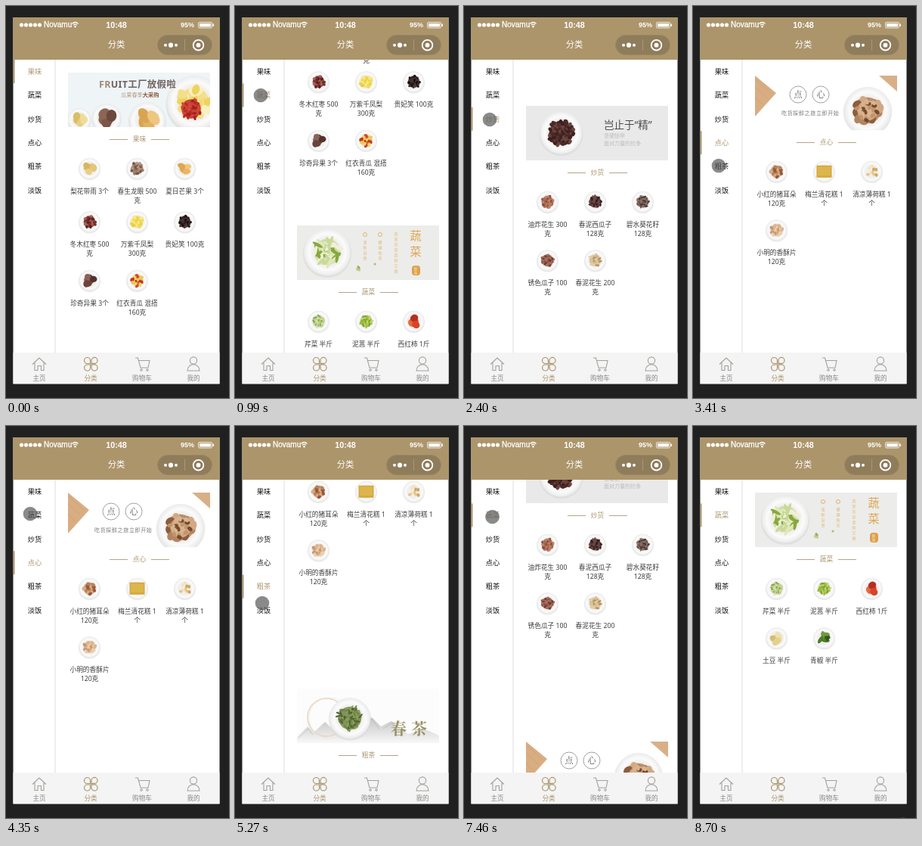
An HTML page that plays this animation: 295x518 px, repeating every 8780 ms.

```html
<!DOCTYPE html>
<html lang="zh-CN">
<head>
<meta charset="utf-8">
<title>分类</title>
<style>
html, body { margin: 0; width: 100%; height: 100%; overflow: hidden; background: #202020; }
svg { display: block; overflow: hidden; }
text { font-family: "Noto Sans", "Noto Sans CJK SC", "Noto Sans CJK", sans-serif; }
.latin { font-family: "Liberation Sans", Arial, sans-serif; }
.brush { font-family: "Noto Serif CJK SC", "Noto Sans CJK SC", serif; }
</style>
</head>
<body>
<svg id="stage" width="100%" height="100%" viewBox="0 0 295 518"></svg>
<script>
const LOOP = 8780, PAGE = 387, SCROLL = 500;
const TAN = '#ab956d', INK = '#3c3c3c', GREY = '#a5a09a';
const tabs = ['果味', '蔬菜', '炒货', '点心', '粗茶', '淡饭'];

let seed = 7;
const rnd = () => (seed = seed * 16807 % 2147483647) / 2147483647;

// Text centred vertically on y
const left = (x, y, s, size, fill, more = '') =>
  `<text x="${x}" y="${y + size * .36}" font-size="${size}" fill="${fill}" ${more}>${s}</text>`;
const text = (x, y, s, size, fill, more = '') => left(x, y, s, size, fill, 'text-anchor="middle" ' + more);
const rect = (x, y, w, h, fill, more = '') =>
  `<rect x="${x}" y="${y}" width="${w}" height="${h}" fill="${fill}" ${more}/>`;
const circle = (x, y, r, fill, more = '') => `<circle cx="${x}" cy="${y}" r="${r}" fill="${fill}" ${more}/>`;
const path = (d, stroke, w = 1, fill = 'none', more = '') =>
  `<path d="${d}" stroke="${stroke}" stroke-width="${w}" fill="${fill}" ${more}/>`;
const column = (x, y, s, size, fill, step) =>
  [...s].map((c, i) => text(x, y + i * step, c, size, fill)).join('');

// Random heap of oval pieces; large heaps get a solid bed
function heap(x, y, r, colors, n, size, thin = .65) {
  const c = colors.split(' ');
  let out = n > 11 ? circle(x, y, r * .8, c[0], 'opacity=".85"') : '';
  for (let i = 0; i < n; i++) {
    const a = i * 2.4 + rnd(), d = Math.sqrt((i + .3) / n) * Math.max(r - size * .7, 0);
    const px = (x + d * Math.cos(a)).toFixed(1), py = (y + d * Math.sin(a) * .95).toFixed(1);
    out += `<ellipse cx="${px}" cy="${py}" rx="${size}" ry="${size * thin}" fill="${c[i % c.length]}" transform="rotate(${rnd() * 180 | 0} ${px} ${py})"/>`;
  }
  return out;
}
const plate = (x, y, r, ...food) =>
  circle(x, y + r * .06, r * 1.04, '#d9d9d9', 'opacity=".6"') + circle(x, y, r, 'url(#dish)') +
  heap(x, y, r * .7, ...food);

// label, colours, piece count, piece size, thinness
const goods = [
  [['梨花带雨 3个', '#e8cf86 #d8b65f #e2c77c', 6, 4.8, .8], ['春生龙眼 500|克', '#9b7763 #77584a #b89a86', 26, 2, .9],
   ['夏日芒果 3个', '#ebb75c #e0a650 #f0c878', 5, 5.4, .65], ['冬木红枣 500|克', '#7a2f28 #591f1c #a4645a', 22, 2.2, .8],
   ['万紫千凤梨|300克', '#f2dc58 #e9cf45 #f7e98b', 24, 2.8, .7], ['贵妃笑 100克', '#2b1d1c #45302c #150e0e', 22, 1.9, .8],
   ['珍奇异果 3个', '#6d443b #8b6257 #53322c', 7, 4.8, .85], ['红衣青瓜 混搭|160克', '#f0d65c #c8322a #e9c84f #d0453a', 20, 2.4, .7]],
  [['芹菜 半斤', '#bcd08a #d5e0aa #86a54c', 22, 2.8, .4], ['泥蒿 半斤', '#9dbd3f #7da12f #c3d774', 28, 3.2, .35],
   ['西红柿 1斤', '#d8432a #e8683c #b52f20', 4, 5.4, .85], ['土豆 半斤', '#e3d28b #d3bd72 #eee3ae', 4, 6.5, .65],
   ['青椒 半斤', '#4d7d28 #6f9c3a #33591c', 8, 5.5, .45]],
  [['油炸花生 300|克', '#a8674f #8f4f3e #c08468', 30, 2, .7], ['春泥西瓜子|128克', '#4b2d2b #6c4844 #341d1d', 30, 2, .6],
   ['碧水葵花籽|128克', '#6b5049 #8b736a #46332f', 30, 2.2, .45], ['锈色瓜子 100|克', '#8f5346 #a9705c #6b382f', 32, 2, .55],
   ['春泥花生 200|克', '#d6bd92 #b7955f #e2cea6', 18, 2.8, .5]],
  [['小红的猪耳朵|120克', '#b98059 #96593a #d7ab83', 18, 2.7, .75], ['梅兰清花糕 1|个', 'cake', 0, 0],
   ['清凉薄荷糕 1|个', '#e6c68a #f2e3c1 #d3a55b', 9, 2.4, .8], ['小明的香酥片|120克', '#dcb48c #e9ceb0 #c89870', 20, 2.9, .7]],
  [],
  [['素米 327克', '#e6d9c6 #dfd0bb #ece1d2', 40, 1.5, .7], ['绿豆 125克', '#74603a #5d4a2a #86734a', 44, 1.5, .9],
   ['芝麻 50克', '#3f2a34 #2c1c24 #4e3742', 44, 1.5, .8], ['猴头菇 370克', '#8a7460 #5c4a3c #b29a80', 16, 2.5, .8],
   ['冰心鸡蛋 2个', '#eee2cf #e2d2ba', 3, 4, .75], ['八宝莲子 200|克', '#e6d6bb #d5bf9d #cdb28e', 24, 1.8, .85],
   ['深涧木耳 78克', '#33292a #5b4c46 #1f1819', 18, 2.6, .7]]
];

const banners = [
  () => rect(82, 88, 188, 72, '#eff4f7') +
    plate(97, 150, 15, '#e6cf84 #d9bd68 #efdc9a', 6, 5.5, .85) + plate(133, 148, 19, '#7b5747 #8d6554 #6b483b', 6, 8, .85) +
    plate(187, 151, 24, '#e3b25c #d9a452 #edc680', 6, 10.5, .65) + plate(249, 128, 36, '#f3df8a #efd35f #faf0bd', 34, 7, .7) +
    heap(245, 136, 16, '#bd2a24 #d7473a #a31f1d', 30, 2.8, .6) +
    left(123, 103.5, '<tspan fill="#a18a77">FR</tspan>UIT工厂放假啦', 12.5, '#6f625f', 'font-weight="600" letter-spacing=".3"') +
    left(152, 117.5, '瓜果春季<tspan font-weight="700" fill="#8b5a3c">大采购</tspan>', 7.2, '#b39a80'),
  () => rect(82, 88, 188, 72, '#ececea') + plate(122, 123, 31, '#c9d99a #dfe8b8 #86a83f #eef1d6', 40, 7.5, .28) +
    column(239, 102, '蔬菜', 15, '#dfa64e', 21) + rect(234, 141, 11, 13, '#dda24c', 'rx="4"') +
    column(239, 145, '鲜味', 4.5, '#f6e6c8', 5) + column(213, 99, '我家的蔬菜鲜又嫩', 5, '#e3bd83', 7) +
    [172, 192].map((x, i) => circle(x, 100, 2.5, 'none', 'stroke="#dfa64e" stroke-width=".8"') +
      column(x, 110, ['清新自然', '健康每天'][i], 5, '#dfb574', 7.2)).join('') +
    heap(163, 145, 4, '#9cae5c #c3cc93', 4, 3, .5) + circle(185, 139, 1.5, '#b3b86a'),
  () => rect(82, 88, 188, 72, '#e9e9e9') + plate(128.5, 123.5, 28, '#4c2926 #6b423c #3d201f', 80, 3, .75) +
    left(185, 113, '岂止于“精”', 13.5, '#4a4a4a') + left(185, 127, '坚硬铠甲', 7, '#bbb') + left(185, 137.5, '面对力量的抗争', 7, '#bbb'),
  () => rect(82, 88, 188, 72, '#fff') + path('M82 88L110 111L82 142Z', 'none', 0, '#d9ad82') +
    path('M82 92L103 111M82 103L98 118M82 116L91 126', '#c99a6d', .6) + path('M246 88H270V109Z', 'none', 0, '#d8b088') +
    plate(231, 134, 31, '#b28560 #8d5d3d #d2a983', 28, 6.5, .75) +
    heap(231, 134, 17, '#d9b48e #754a30 #c1946e', 18, 3.6, .7) +
    ['点', '心'].map((c, i) => circle(139 + i * 30, 113, 11, 'none', 'stroke="#888" stroke-width=".8"') +
      text(139 + i * 30, 113, c, 11, '#555', 'class="brush"')).join('') +
    left(117, 137, '吃货探鲜之旅立即开始', 7, '#777', 'letter-spacing=".65"'),
  () => rect(82, 88, 188, 72, '#fcfcfc') +
    path('M82 152L96 138L104 146L119 132L138 150L165 139L181 126L193 138L207 131L229 148L250 141L270 150V160H82Z', 'none', 0, 'url(#mist)') +
    path('M84 153L97 141L103 149M170 138L181 128L191 142M196 141L207 134L218 146', '#bbb', .7) +
    circle(121, 126, 25, 'none', 'stroke="#e6d3bf" stroke-width="1.5"') + circle(125, 127, 27, 'none', 'stroke="#efe4d8" stroke-width=".7"') +
    plate(152, 127, 27, '#6f8345 #8ba05a #4e6230', 60, 4, .3) +
    left(206, 140, '春茶', 21, '#9b9166', 'class="brush" font-weight="600" letter-spacing="6"'),
  () => rect(82, 88, 188, 72, 'url(#linen)') +
    path('M266 160C250 142 247 128 240 112S226 98 212 89M247 130C256 117 257 104 268 92', '#aa9f90', 2.2) +
    path('M251 141C240 146 232 150 226 160M240 112C246 104 244 96 248 88M229 101C228 108 222 112 221 120M256 112C262 115 266 114 270 118', '#b5aa9c', 1.2) +
    plate(114, 124, 29, '#e3d5c3 #dccdb9 #eae0d2', 150, 1.8, .65) + rect(147.5, 105, 71, 40, '#fff', 'opacity=".93"') +
    text(183, 117, '特级大米', 11.3, '#4b4644', 'font-weight="500"') + left(161, 134, '粒粒皆珍品', 6.9, '#666') +
    rect(198, 131.5, 5, 5, 'none', 'stroke="#c9b5a5" stroke-width=".7" rx="1"')
];

function product([label, ...food], x, y) {
  const dish = food[0] === 'cake'
    ? plate(x, y - 30, 14, '#fff', 0, 1) + rect(x - 10, y - 38, 20, 16, '#d3a63c') + rect(x - 8.5, y - 36.5, 17, 12, '#dcb54c')
    : plate(x, y - 30, 14, ...food);
  return dish + label.split('|').map((s, i) => text(x, y + i * 12, s, 8.7, INK)).join('');
}

function section(i) {
  let out = `<svg x="82" y="88" width="188" height="72" viewBox="82 88 188 72">${banners[i]()}</svg>` +
    path('M137 176.5H161M192 176.5H216', '#b5a58a', 1) + text(176.5, 176.3, tabs[i], 8.7, TAN), y = 244.7;
  for (let k = 0; k < goods[i].length; k += 3) {
    const row = goods[i].slice(k, k + 3);
    row.forEach((g, c) => out += product(g, 110.5 + c * 63, y));
    y += !row.some(g => g[0].includes('|')) ? 65.5 : i == 0 && k == 0 ? 70.5 : 77.5;
  }
  return `<g transform="translate(0 ${i * PAGE})">${out}</g>`;
}

const header = rect(9.5, 15, 273, 56, '#ac956b') +
  [20.5, 26.5, 32.5, 38.5, 44.5].map(x => circle(x, 25, 2.6, '#fff')).join('') +
  left(50, 24.7, 'Novamu', 10, '#fff', 'class="latin" stroke="#fff" stroke-width=".3"') +
  path('M87.5 23.5Q91.5 19.5 95.5 23.5M89.2 25.4Q91.5 23 93.8 25.4', '#fff', 1.3) + circle(91.5, 27.3, 1.2, '#fff') +
  text(146, 24.7, '10:48', 10.8, '#fff', 'class="latin" font-weight="700"') +
  left(231, 25, '95%', 9, '#fff', 'class="latin" font-weight="700"') +
  rect(254.5, 21.5, 18, 7.5, 'none', 'stroke="#fff" stroke-width=".8" rx="1.5"') + rect(256, 23, 15, 4.5, '#fff') +
  rect(273.5, 23.5, 1.5, 3.5, '#fff') + text(146, 51.3, '分类', 11.3, '#fff', 'font-weight="500"') +
  rect(200.5, 38.5, 72, 26, '#8f7c5b', 'rx="13" stroke="#9a8762"') + path('M236.5 44V59', '#a9987a', 1) +
  circle(211, 51.7, 2, '#fff') + circle(218, 51.7, 3.1, '#fff') + circle(225, 51.7, 2, '#fff') +
  circle(254.5, 51.7, 6.8, 'none', 'stroke="#fff" stroke-width="1.8"') + circle(254.5, 51.7, 2.9, '#fff');

const petal = a => path('M111.5 472.5h-4a4 4 0 1 1 4 -4z', TAN, 1.2, 'none', `transform="rotate(${a} 112.3 473.2)"`);
const footer = rect(9.5, 458, 273, 41.5, '#f4f4f4') +
  path('M35 473.5L44 465L53 473.5M38 471.5V481.5H42V475.5H46.5V481.5H50V471.5', GREY, 1.1) +
  [0, 90, 180, 270].map(petal).join('') +
  path('M171 465H174.5L178 478H188L190 468.5H176', GREY, 1.1) +
  [179, 187].map(x => circle(x, 481, 1.3, 'none', `stroke="${GREY}"`)).join('') +
  circle(248, 468.5, 4.6, 'none', `stroke="${GREY}" stroke-width="1.1"`) + path('M240 482C240 471 256 471 256 482Z', GREY, 1.1) +
  ['主页', '分类', '购物车', '我的'].map((s, i) => text(44 + i * 68, 492, s, 8.6, i == 1 ? TAN : '#888')).join('');

const stage = document.getElementById('stage');
stage.innerHTML = `<defs>
  <radialGradient id="dish"><stop offset=".6" stop-color="#f1efed"/><stop offset=".78" stop-color="#fbfbfb"/><stop offset="1" stop-color="#ebebeb"/></radialGradient>
  <linearGradient id="mist" x2="0" y2="1"><stop stop-color="#c4c4c4"/><stop offset="1" stop-color="#f8f8f8"/></linearGradient>
  <linearGradient id="linen"><stop stop-color="#d3cbc2"/><stop offset=".55" stop-color="#e4dfd9"/><stop offset="1" stop-color="#dcd6ce"/></linearGradient></defs>` +
  rect(9.5, 15, 273, 484, '#fff') +
  `<svg x="66" y="71" width="216" height="${PAGE}" viewBox="66 71 216 ${PAGE}"><g id="list">${tabs.map((_, i) => section(i)).join('')}</g></svg>` +
  path('M65 71V458', '#dcdcdc') + `<g id="menu">${tabs.map((s, i) => text(38, 86.5 + i * 31.4, s, 9.2, '#111')).join('')}</g>` +
  rect(9.5, 71, 2, 31, TAN, 'id="bar"') + header + footer +
  circle(0, 0, 9.3, '#585858', 'id="touch" opacity=".7"');
const [list, menu, bar, touch] = ['list', 'menu', 'bar', 'touch'].map(id => document.getElementById(id));

// tap time, scroll start, tab
const taps = [[760, 850, 1], [1950, 2100, 2], [2900, 2974, 3], [4990, 5163, 4], [5930, 6090, 5], [7110, 7250, 1]];
// time, x, y
const trail = [[220, 258, 475], [430, 34, 118], [1300, 34, 118], [1550, 34, 133], [1700, 34, 150], [2750, 34, 150],
  [2880, 34, 181], [3100, 34, 181], [3410, 34, 211], [3580, 33, 221], [3770, 33, 221], [4350, 32, 116], [4530, 32, 116],
  [4810, 38, 208], [4960, 37, 212], [5060, 37, 214], [5270, 36, 234], [5830, 36, 234], [5930, 36, 243], [6700, 36, 243],
  [6950, 37.5, 120], [8100, 37.5, 120], [8320, 268, 498], [8700, 278, 526.5]];

// cubic-bezier(.25, .1, .25, 1)
function ease(t) {
  if (t <= 0) return 0;
  if (t >= 1) return 1;
  const bez = (s, a, b) => 3 * a * s * (1 - s) ** 2 + 3 * b * s * s * (1 - s) + s ** 3;
  let lo = 0, hi = 1;
  for (let i = 0; i < 20; i++) {
    const m = (lo + hi) / 2;
    bez(m, .25, .25) < t ? lo = m : hi = m;
  }
  return bez(lo, .1, 1);
}

function draw(t) {
  let active = 0, pos = 0;
  for (const [tap, start, tab] of taps) {
    if (t >= tap) active = tab;
    pos += (tab - pos) * ease((t - start) / SCROLL);
  }
  list.setAttribute('transform', `translate(0 ${-Math.round(pos * PAGE)})`);
  bar.setAttribute('y', 71 + active * 31.4);
  [...menu.children].forEach((el, i) => el.setAttribute('fill', i == active ? TAN : '#111'));

  touch.style.display = t < trail[0][0] ? 'none' : '';
  const i = trail.findIndex(p => p[0] > t), b = trail.at(i), a = i > 0 ? trail[i - 1] : b;
  const k = a === b ? 0 : (t - a[0]) / (b[0] - a[0]);
  touch.setAttribute('cx', a[1] + (b[1] - a[1]) * k);
  touch.setAttribute('cy', a[2] + (b[2] - a[2]) * k);
}

const begin = performance.now();
function tick() {
  draw((performance.now() - begin) % LOOP);
  requestAnimationFrame(tick);
}
tick();
</script>
</body>
</html>
```
